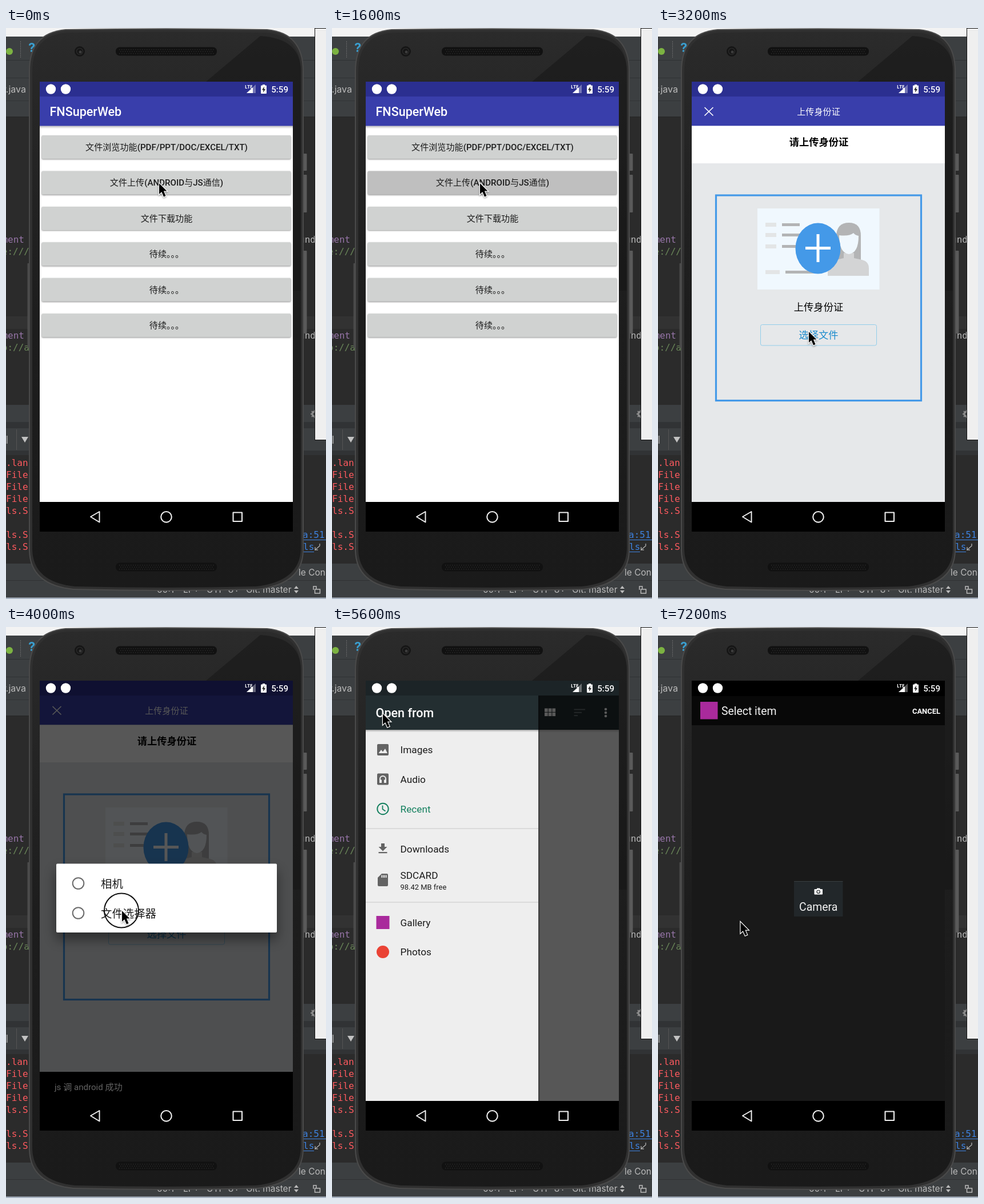
An HTML page with a canvas that plays this animation: 560 by 1000 pixels, repeating every 8000 ms.

```html
<!DOCTYPE html>
<html lang="zh">
<head>
<meta charset="utf-8">
<style>
html, body { margin: 0; width: 100%; height: 100%; overflow: hidden; background: #2b2b2b; }
canvas { display: block; width: 560px; height: 1000px; }
</style>
</head>
<body>
<canvas id="stage" width="560" height="1000"></canvas>
<script>
const ctx = document.getElementById('stage').getContext('2d');
const UI = 'Roboto, "Noto Sans CJK SC", "Noto Sans CJK", sans-serif';
const MONO = '"DejaVu Sans Mono", monospace';
const IDE = 'Inter, sans-serif';
const BLUE = '#4499e8';
const STEP = 800, LOOP = 8000;

function rect(x, y, w, h, color) {
  ctx.fillStyle = color;
  ctx.fillRect(x, y, w, h);
}
function round(x, y, w, h, r, color) {
  ctx.fillStyle = color;
  ctx.beginPath();
  ctx.roundRect(x, y, w, h, r);
  ctx.fill();
}
function ellipse(x, y, rx, ry, color) {
  ctx.fillStyle = color;
  ctx.beginPath();
  ctx.ellipse(x, y, rx, ry, 0, 0, Math.PI * 2);
  ctx.fill();
}
function ring(x, y, r, width, color) {
  ctx.strokeStyle = color;
  ctx.lineWidth = width;
  ctx.beginPath();
  ctx.arc(x, y, r, 0, Math.PI * 2);
  ctx.stroke();
}
function line(points, width, color) {
  ctx.strokeStyle = color;
  ctx.lineWidth = width;
  ctx.beginPath();
  points.forEach(([x, y]) => ctx.lineTo(x, y));
  ctx.stroke();
}
function poly(points, color) {
  ctx.fillStyle = color;
  ctx.beginPath();
  points.forEach(([x, y]) => ctx.lineTo(x, y));
  ctx.fill();
}
function shape(path, color) {
  ctx.fillStyle = color;
  ctx.fill(new Path2D(path));
}
function text(str, x, y, size, color, { weight = 400, align = 'left', font = UI } = {}) {
  ctx.font = `${weight} ${size}px ${font}`;
  ctx.textAlign = align;
  ctx.fillStyle = color;
  ctx.fillText(str, x, y);
}
function fade(y, h, strength, x = 59, w = 443) {
  const g = ctx.createLinearGradient(0, y, 0, y + h);
  g.addColorStop(0, `rgba(0,0,0,${strength})`);
  g.addColorStop(1, 'rgba(0,0,0,0)');
  rect(x, y, w, h, g);
}
function withShadow(blur, dy, alpha, draw) {
  ctx.save();
  ctx.shadowColor = `rgba(0,0,0,${alpha})`;
  ctx.shadowBlur = blur;
  ctx.shadowOffsetY = dy;
  draw();
  ctx.restore();
}

function drawEditor() {
  const mono = { font: MONO }, ide = { font: IDE };
  rect(0, 0, 560, 1000, '#2b2b2b');
  rect(0, 0, 560, 15, '#f3f3f3');
  rect(0, 15, 560, 142, '#3c3f41');
  rect(0, 56, 560, 1, '#2f3133');
  rect(0, 87, 560, 1, '#303234');
  rect(0, 127, 560, 1, '#323436');
  rect(0, 155, 560, 2, '#292929');
  rect(0, 505, 560, 22, '#323232');
  rect(0, 660, 560, 30, '#3c3f41');
  rect(0, 690, 560, 11, '#313335');
  rect(0, 701, 560, 39, '#3c3f41');
  rect(0, 740, 560, 8, '#313335');
  rect(0, 938, 560, 60, '#3c3f41');
  rect(0, 967, 560, 1, '#2f3133');
  rect(0, 997.5, 560, 2.5, '#a9b4c2');

  ellipse(6, 41, 6, 6, '#7cb342');
  for (let y = 23; y < 52; y += 3) rect(25, y, 1, 1.5, '#777');
  text('?', 39, 42, 22, '#3a9fd0', { font: IDE, weight: 700 });
  text('r.java', 35, 113, 16, '#bbb', { font: IDE, align: 'right' });

  text('ment', 32, 376, 16, '#9876aa', { ...mono, align: 'right' });
  text('le:///', 41, 397, 16, '#6a8759', { ...mono, align: 'right' });
  text('ment', 32, 544, 16, '#9876aa', { ...mono, align: 'right' });
  text('p://a', 41, 565, 16, '#6a8759', { ...mono, align: 'right' });
  text('und', 513, 376, 16, '#bababa', mono);
  text('und', 513, 544, 16, '#bababa', mono);

  rect(1, 714, 1.5, 14, '#aaa');
  rect(18, 703, 1, 36, '#555');
  poly([[27, 716], [39, 716], [33, 726]], '#c2c2c2');
  ['.lan', 'File', 'File', 'File', 'ls.S', '', 'ls.S', 'ls.S'].forEach((s, i) =>
    text(s, 0, 767 + i * 21, 16, '#ff5a5f', mono));
  text('a:51', 519, 893, 16, '#3d82e0', mono);
  rect(519, 896, 41, 1, '#3d82e0');
  text('ls', 520, 914, 16, '#3d82e0', mono);
  rect(520, 917, 19, 1, '#3d82e0');
  line([[549, 903], [549, 907], [541, 914], [541, 909]], 1.2, '#bbb');
  line([[541, 914], [546, 914]], 1.2, '#bbb');

  ring(540, 676, 4, 3, '#8c8c8c');
  for (let i = 0; i < 4; i++) {
    const a = i * Math.PI / 4, c = Math.cos(a) * 7, s = Math.sin(a) * 7;
    line([[540 - c, 676 - s], [540 - c * .6, 676 - s * .6]], 2, '#8c8c8c');
    line([[540 + c, 676 + s], [540 + c * .6, 676 + s * .6]], 2, '#8c8c8c');
  }
  text('le Console', 512, 959, 15.5, '#bbb', ide);
  text('60:1', 264, 989, 15.5, '#bbb', ide);
  text('LF÷', 310, 989, 15.5, '#bbb', ide);
  text('UTF-8÷', 351, 989, 15.5, '#bbb', ide);
  text('Git: master', 420, 989, 15.5, '#bbb', ide);
  poly([[504, 982], [508, 977], [512, 982]], '#bbb');
  poly([[504, 985], [508, 990], [512, 985]], '#bbb');
  ctx.strokeStyle = '#bbb';
  ctx.lineWidth = 1.5;
  ctx.strokeRect(540.5, 983, 9, 7);
  line([[538, 984], [538, 978], [543, 978], [543, 983]], 1.5, '#bbb');

  rect(540, 0, 20, 722, '#111');
  rect(541, 1, 19, 720, '#efefef');
}

function speaker(y) {
  round(192, y, 177, 15, 7, '#111');
  for (let r = 0; r < 3; r++)
    for (let x = 198 + (r % 2) * 2; x < 364; x += 4) rect(x, y + 3.5 + r * 3.5, 1.5, 1.5, '#2a2a2a');
}

function drawPhone() {
  round(37.5, 412, 4, 148, 1, '#4b4b4b');
  [[220, 30], [257, 66], [390, 145]].forEach(([y, h]) => round(520, y, 6.5, h, 1, '#5a5a5a'));
  shape('M40 75Q40 8 104 2Q280-1 457 2Q521 8 521 75V915Q520 975 440 984Q280 988 118 984Q41 976 40 915Z', '#4a4a4a');
  shape('M42 75Q42 10 104 4Q280 1 457 4Q519 10 519 75V915Q518 973 440 982Q280 986 118 982Q43 974 42 915Z', '#303030');
  const g = ctx.createLinearGradient(0, 6, 0, 980);
  g.addColorStop(0, '#2b2b2b');
  g.addColorStop(.1, '#272727');
  g.addColorStop(.5, '#1d1d1d');
  g.addColorStop(1, '#1a1a1a');
  shape('M46 76Q46 13 106 8Q280 5 455 8Q516 13 516 76V913Q514 969 438 978Q280 982 120 978Q47 970 46 913Z', g);
  shape('M350 94L445 14Q516 18 516 76V460H502V94Z', 'rgba(20,20,20,.5)');
  ellipse(129, 41, 9, 9, '#151515');
  ring(129, 41, 5.5, 1.5, '#292929');
  ellipse(130, 42, 2.5, 2.5, '#3c3c3c');
  speaker(33.5);
  speaker(936.5);
}

function statusIcons() {
  ellipse(78.5, 107, 8.7, 8.7, '#fff');
  ellipse(104.5, 107, 8.7, 8.7, '#fff');
  poly([[437, 99], [437, 114], [421, 114]], 'rgba(255,255,255,.35)');
  poly([[432, 104], [432, 114], [421, 114]], '#fff');
  text('LTE', 418, 106, 8, '#fff', { weight: 700, font: '"Open Sans", sans-serif' });
  rect(449, 99, 4, 2, '#fff');
  round(446, 100.5, 10, 14.5, 1, '#fff');
  poly([[452, 102.5], [448, 108.5], [450.5, 108.5], [450, 113], [454, 107], [451.5, 107]], '#222');
  text('5:59', 494, 113, 15.1, '#fff', { weight: 500, align: 'right' });
}

function navBar(top = 830) {
  rect(59, top, 443, 882 - top, '#000');
  ctx.lineJoin = 'round';
  ctx.strokeStyle = '#eee';
  ctx.lineWidth = 2;
  ctx.stroke(new Path2D('M148 856L163.500 847V865.500Z'));
  ring(280.5, 856.3, 9.3, 2.1, '#eee');
  ctx.strokeRect(397.500, 848.500, 15.500, 15.500);
  ctx.lineJoin = 'miter';
}

function indigoBars() {
  rect(59, 94, 443, 26, '#2b2f90');
  rect(59, 120, 443, 51.5, '#393eab');
}

function menuScreen(pressed) {
  rect(59, 94, 443, 736, '#fff');
  indigoBars();
  fade(171.5, 5, .25);
  text('FNSuperWeb', 76.5, 154, 21.56, '#fff', { weight: 500 });
  const labels = ['文件浏览功能(PDF/PPT/DOC/EXCEL/TXT)', '文件上传(ANDROID与JS通信)', '文件下载功能',
    '待续。。。', '待续。。。', '待续。。。'];
  labels.forEach((label, i) => {
    const y = 188 + i * 62.45;
    withShadow(2.5, 1.2, .4, () => round(62.5, y, 436, 41, 2, i === pressed ? '#bfbfbf' : '#d0d2d1'));
    text(label, 281, y + 26, 15.1, '#1c1c1c', { weight: 500, align: 'center' });
  });
}

function idCard() {
  rect(174, 316, 213.5, 142, '#f0f8fe');
  [341, 359, 379].forEach(y => {
    rect(188, y, 19, 7, '#e3e5e6');
    rect(217, y + 1, 31, 5, '#b3b4b5');
  });
  rect(188, 424, 25, 7, '#e3e5e6');
  rect(223, 425, 60, 5, '#b3b4b5');
  shape('M312 406V364Q313 341 334 341Q355 341 355 364V406Z', '#b3b4b5');
  shape('M297 434V421Q298 409 312 406L325 403V394H343V403L357 406Q369 409 369 421V434Z', '#d3d4d5');
  shape('M317 363Q335 365 342 359Q345 363 351 364Q351 394 334 396Q317 394 317 363Z', '#f0f8fe');
  ellipse(280, 386, 39.5, 44.5, BLUE);
  rect(258, 383, 44, 5, '#fff');
  rect(277.5, 361, 5, 49, '#fff');
}

function uploadScreen() {
  const center = { align: 'center' };
  rect(59, 94, 443, 736, '#e6e8ea');
  indigoBars();
  line([[81.5, 139], [96.5, 153.500]], 1.7, '#fff');
  line([[96.5, 139], [81.5, 153.500]], 1.7, '#fff');
  text('上传身份证', 281, 151.5, 15.1, '#fff', center);
  rect(59, 171.5, 443, 65.5, '#fff');
  text('请上传身份证', 281.5, 206, 17.25, '#000', { ...center, weight: 700 });
  ctx.strokeStyle = BLUE;
  ctx.lineWidth = 3.2;
  ctx.strokeRect(101.5, 293, 359, 359.5);
  idCard();
  text('上传身份证', 281, 495, 17.25, '#000', center);
  ctx.strokeStyle = '#92cdea';
  ctx.lineWidth = 1;
  ctx.beginPath();
  ctx.roundRect(179.5, 519.5, 203, 36.5, 3);
  ctx.stroke();
  text('选择文件', 281, 543.5, 17.25, '#1b8bcd', center);
}

function chooserScreen() {
  uploadScreen();
  rect(59, 94, 443, 736, 'rgba(0,0,0,.66)');
  rect(59, 779, 443, 51, '#000');
  text('js 调 android 成功', 85, 811, 15.1, '#636363');
  withShadow(22, 12, .45, () => round(88, 414.5, 386, 120.5, 2, '#fff'));
  ['相机', '文件选择器'].forEach((label, i) => {
    ring(126.5, 449 + i * 52, 9.8, 2, '#6b6b6b');
    text(label, 166, 456.5 + i * 52, 19.4, '#1c1c1c');
  });
  ring(202, 496.5, 30, 2, '#111');
}

function pickerBar(dy) {
  const y = 150 + dy;
  rect(59, 94 + dy, 443, 26, '#1c2427');
  rect(59, 120 + dy, 443, 60, '#232e31');
  [-5, 0, 5].forEach(d => rect(79, y - 1 + d, 19.5, 2, '#fff'));
  text('Recent', 136.5, y + 8, 21.56, '#fff', { weight: 500 });
  for (let i = 0; i < 6; i++) rect(372 + (i % 3) * 6.7, y - 7.500 + (i > 2 ? 7.3 : 0), 5.7, 6.3, '#fff');
  [19.5, 13.5, 6.5].forEach((w, i) => rect(423.5, y - 6.5 + i * 5.3, w, 2, '#667073'));
  [-6, 0, 6].forEach(d => ellipse(479, y + d, 2.3, 2.3, '#fff'));
}

function pickerScreen() {
  rect(59, 94, 443, 3.5, '#25276f');
  rect(59, 97, 443, 740, '#fafafa');
  pickerBar(3.7);
}

function drawerIcons() {
  const gray = '#636363', paper = '#eee';
  round(79, 205, 20, 20, 2, gray);
  poly([[81.5, 221], [86, 215], [89, 218.5], [93, 213], [97, 221]], paper);
  round(79, 256.500, 20, 20, 2, gray);
  ctx.strokeStyle = paper;
  ctx.lineWidth = 2;
  ctx.stroke(new Path2D('M84 272V266A5 5 0 0 1 94 266V272'));
  rect(83, 267.5, 4, 5.5, paper);
  rect(91, 267.5, 4, 5.5, paper);
  ring(89, 318.5, 9.7, 2, '#15805f');
  line([[88.5, 312.5], [88.5, 319], [93.5, 322.5]], 1.8, '#15805f');
  poly([[86, 379], [92, 379], [92, 385], [96.5, 385], [89, 392.5], [81.5, 385], [86, 385]], gray);
  rect(81.5, 394, 15, 2.2, gray);
  shape('M87 432H96Q98 432 98 434V452Q98 454 96 454H82Q80 454 80 452V439Z', gray);
  [86.5, 90, 93.5].forEach(x => rect(x, 434.5, 2, 4.5, paper));
  rect(77.5, 506, 23, 23, '#a92a9c');
  ellipse(89, 569, 11, 11, '#ea4335');
}

function drawerScreen() {
  rect(59, 94, 443, 736, '#fafafa');
  pickerBar(0);
  fade(180, 5, .2);
  rect(59, 120, 443, 710, 'rgba(0,0,0,.65)');
  rect(361, 120, 3, 710, 'rgba(0,0,0,.2)');
  rect(59, 120, 302, 60, '#232e31');
  rect(59, 180, 302, 650, '#eee');
  fade(180, 4, .3, 59, 302);
  text('Open from', 76.5, 158, 21.56, '#fff', { weight: 500 });
  const rows = [['Images', 221], ['Audio', 273], ['Recent', 325], ['Downloads', 395],
    ['SDCARD', 441], ['Gallery', 523.5], ['Photos', 575]];
  rows.forEach(([label, y]) => text(label, 119.5, y, 17.25, label === 'Recent' ? '#15805f' : '#1c1c1c'));
  text('98.42 MB free', 119.5, 460, 12.94, '#1c1c1c');
  rect(59, 352.5, 302, 1, '#c9c9c9');
  rect(59, 481.5, 302, 1, '#c9c9c9');
  drawerIcons();
}

function galleryScreen() {
  rect(59, 94, 443, 27, '#000');
  rect(59, 121, 443, 51, '#080808');
  rect(59, 172, 443, 658, '#191919');
  rect(74, 131, 30.5, 30.5, '#a92a9c');
  text('Select item', 111, 154, 19.4, '#f2f2f2');
  text('CANCEL', 494, 151.5, 12.94, '#fff', { weight: 700, align: 'right' });
  rect(238, 445, 85.5, 62, '#22272a');
  rect(238, 445, 85.5, 1, '#3a3f41');
  round(273.500, 459, 14.5, 9.5, 1, '#fff');
  rect(278, 457.5, 5.5, 2, '#fff');
  ring(280.7, 463.7, 2.7, 1.2, '#22272a');
  text('Camera', 280.7, 497, 19.4, '#f2f2f2', { align: 'center' });
}

function cursor(x, y) {
  ctx.save();
  ctx.translate(x, y);
  const arrow = new Path2D('M1 2V21L5.300 17L9 25.500L12.500 24L8.900 15.600H14.500Z');
  withShadow(3, 1.5, .35, () => {
    ctx.strokeStyle = '#fff';
    ctx.lineWidth = 2.4;
    ctx.stroke(arrow);
  });
  ctx.fillStyle = '#000';
  ctx.fill(arrow);
  ctx.restore();
}

const scenes = [
  { draw: () => menuScreen(), at: [267, 270] },
  { draw: () => menuScreen(), at: [258, 270] },
  { draw: () => menuScreen(1), at: [258, 270] },
  { draw: uploadScreen, at: [261, 400] },
  { draw: uploadScreen, at: [263, 530] },
  { draw: chooserScreen, at: [202, 495] },
  { draw: pickerScreen, at: [202, 495], nav: 834 },
  { draw: drawerScreen, at: [88, 150] },
  { draw: drawerScreen, at: [147, 512] },
  { draw: galleryScreen, at: [143.5, 515] },
];

function render(time) {
  const scene = scenes[Math.floor((time % LOOP) / STEP)];
  drawEditor();
  drawPhone();
  ctx.save();
  ctx.beginPath();
  ctx.rect(59, 94, 443, 788);
  ctx.clip();
  scene.draw();
  statusIcons();
  navBar(scene.nav);
  ctx.restore();
  cursor(...scene.at);
}

const start = performance.now();
function tick() {
  render(performance.now() - start);
  requestAnimationFrame(tick);
}
tick();
</script>
</body>
</html>
```
